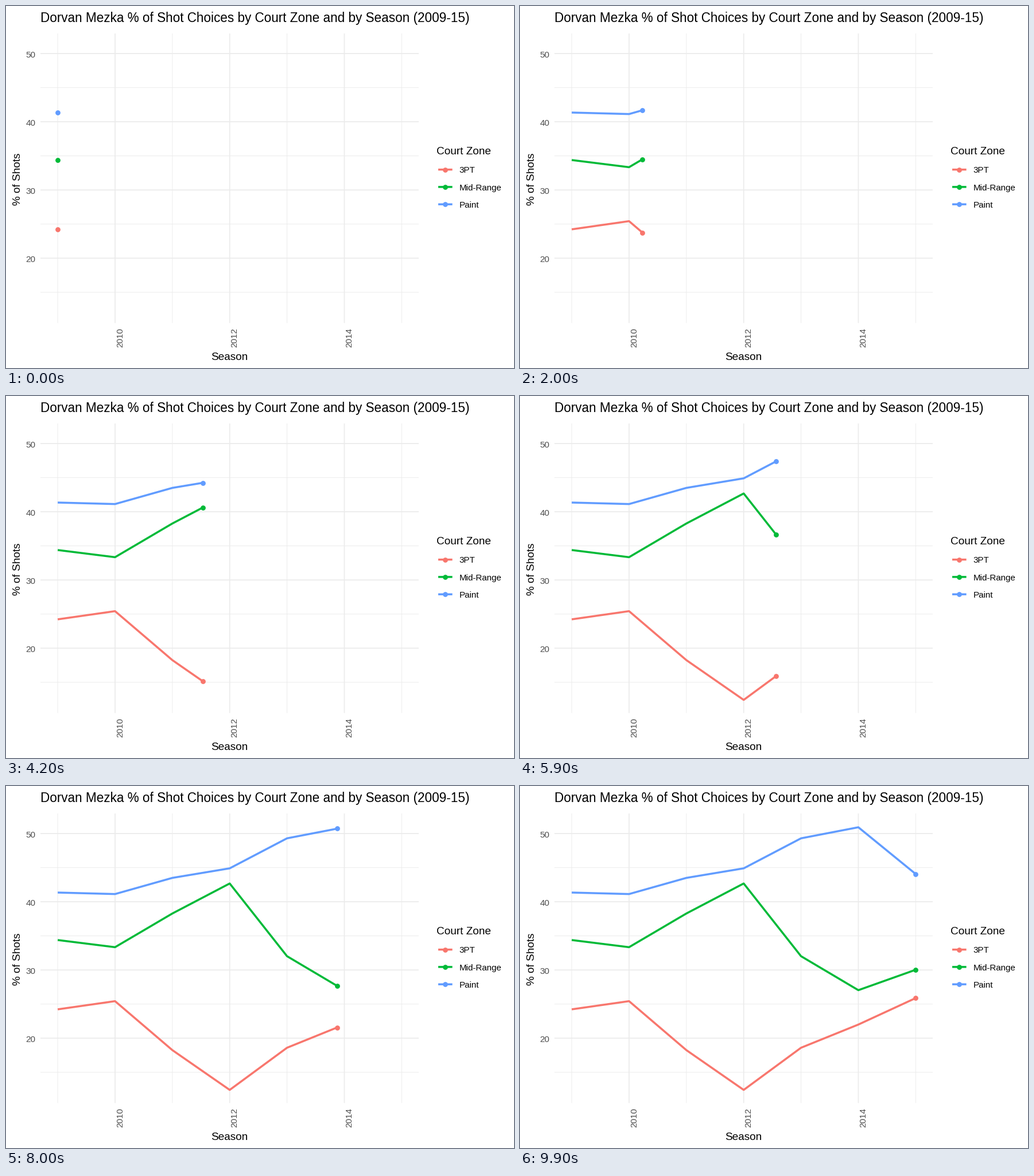
Animation of 885 by 632 pixels, one loop 10 s. Source, as a matplotlib script:

```python
import matplotlib.pyplot as plt
import numpy as np
from matplotlib.animation import FuncAnimation

W, H, DPI = 885, 632, 100
FRAMES, INTERVAL = 100, 100
PX = 72 / DPI  # points per pixel

LEFT, RIGHT, TOP, BOTTOM = 60, 719, 48, 553.5
GRID, TICK = "#EBEBEB", "#4D4D4D"

plt.rcParams["font.family"] = "Liberation Sans"

YEARS = np.arange(2009, 2016)
ZONES = {
    "3PT": ("#F8766D", [24.23, 25.43, 18.25, 12.42, 18.60, 22.00, 25.88]),
    "Mid-Range": ("#00BA38", [34.39, 33.34, 38.28, 42.68, 32.02, 27.04, 30.03]),
    "Paint": ("#619CFF", [41.35, 41.13, 43.50, 44.90, 49.30, 50.92, 44.07]),
}
# Each season is reached on a whole frame (halves round to even).
ARRIVAL = np.round(np.linspace(0, FRAMES - 1, len(YEARS)))


def px(year):
    return 90.1 + 99.87 * (np.asarray(year) - 2009)


def py(share):
    return 83.0 + 11.91 * (50 - np.asarray(share))


fig = plt.figure(figsize=(W / DPI, H / DPI), dpi=DPI, facecolor="white")
ax = fig.add_axes([0, 0, 1, 1])
ax.set_xlim(0, W)
ax.set_ylim(H, 0)
ax.axis("off")


def label(x, y, s, size, color="black", ha="left", rotation=0):
    ax.text(x, y, s, fontsize=size * PX, color=color, ha=ha, va="baseline",
            rotation=rotation, rotation_mode="anchor")


def rule(xs, ys, major):
    ax.plot(xs, ys, color=GRID, lw=(1.7 if major else 0.9) * PX,
            solid_capstyle="butt", snap=False, zorder=1)


def stroke(xs, ys, color):
    return ax.plot(xs, ys, color=color, lw=3.5 * PX, zorder=2, snap=False,
                   solid_capstyle="butt", solid_joinstyle="round")[0]


def dot(x, y, color):
    return ax.plot([x], [y], "o", color=color, ms=8.8 * PX, mew=0,
                   snap=False, zorder=3)[0]


def draw_grid():
    for year in YEARS:
        x, major = px(year), year % 2 == 0
        rule([x, x], [TOP, BOTTOM], major)
        if major:
            label(x + 12.9, 579.3, str(year), 15.2, TICK, "center", 90)
    for share in range(15, 51, 5):
        y, major = py(share), share % 10 == 0
        rule([LEFT, RIGHT], [y, y], major)
        if major:
            label(51.6, y + 6.5, str(share), 15.3, TICK, "right")


def draw_titles():
    label(59.6, 28, "Dorvan Mezka % of Shot Choices by Court Zone "
          "and by Season (2009-15)", 22.55)
    label(389.5, 617.5, "Season", 19, ha="center")
    label(24.7, 302, "% of Shots", 19, ha="center", rotation=90)


def draw_legend():
    label(749.6, 259, "Court Zone", 19)
    for i, (name, (color, _)) in enumerate(ZONES.items()):
        y = 285.6 + 30.3 * i
        stroke([753, 777.6], [y, y], color)
        dot(765.3, y, color)
        label(789.8, y + 5.8, name, 15.1)


draw_grid()
draw_titles()
draw_legend()
series = [(np.array(v), stroke([], [], c), dot(px(2009), py(v[0]), c))
          for c, v in ZONES.values()]


def update(frame):
    now = np.interp(frame, ARRIVAL, YEARS)
    seen = YEARS < now
    artists = []
    for values, line, head in series:
        x, y = px(now), py(np.interp(now, YEARS, values))
        line.set_data(np.append(px(YEARS[seen]), x),
                      np.append(py(values[seen]), y))
        head.set_data([x], [y])
        artists += [line, head]
    return artists


anim = FuncAnimation(fig, update, frames=FRAMES, interval=INTERVAL,
                     repeat=True, repeat_delay=0, blit=False)
plt.show()
```
